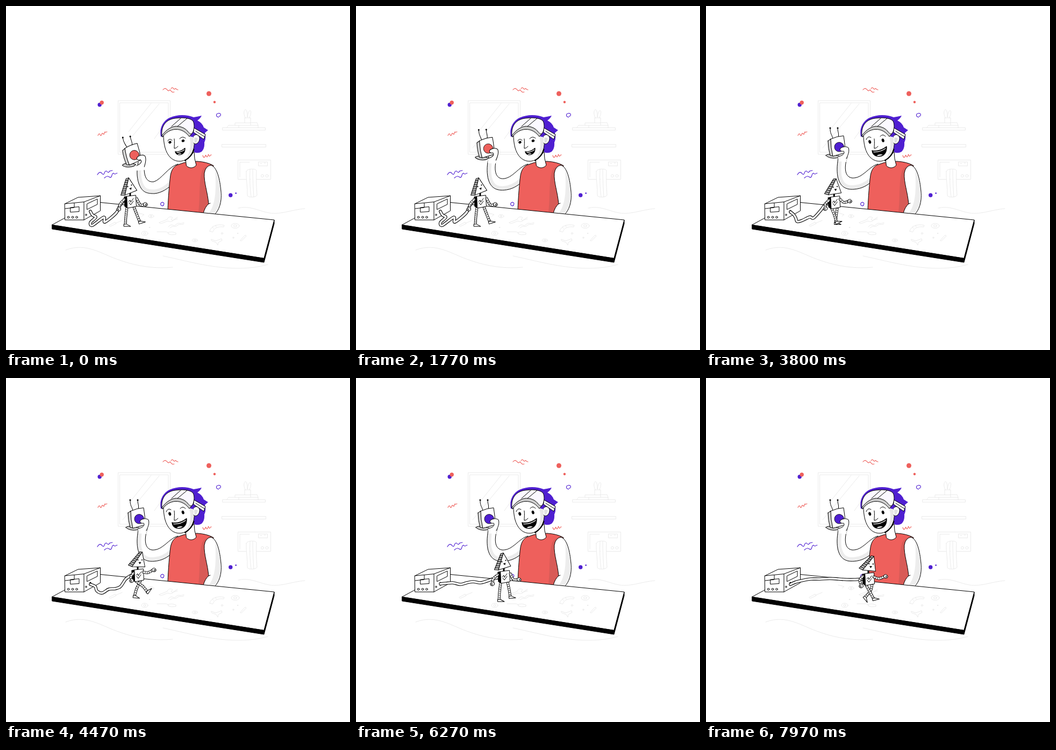
Write an HTML page that moves like this. It is 640 by 640 pixels and loops after 8 s.

```html
<!DOCTYPE html>
<html lang="en">
<head>
<meta charset="utf-8">
<title>Workbench</title>
<style>
  html, body { margin: 0; width: 100%; height: 100%; overflow: hidden; background: #fff; }
  svg { display: block; width: 100%; height: 100%; }
  svg * { stroke-linecap: round; stroke-linejoin: round; }
  .faint { fill: none; stroke: #e8e8e8; stroke-width: .9; }
  .ink { fill: #fff; stroke: #000; stroke-width: 1; }
  .line { fill: none; stroke: #000; stroke-width: 1; }
  .red { fill: none; stroke: #ee605c; stroke-width: 1.1; }
  .blue { fill: none; stroke: #4f1fd1; stroke-width: 1.1; }
</style>
</head>
<body>
<svg viewBox="0 0 640 640">
  <defs><clipPath id="armClip"><path id="armClipPath"/></clipPath></defs>

  <g class="faint">
    <path d="M209,176H305.5V276H209ZM212,180H302V272H212ZM228,234L270,181M217,264L285,182M276,247L302,210"/>
    <path d="M403,226.500H482.500V231H403ZM402,257.500H483.500V262.500H402Z"/>
    <path d="M411,226L414,222H433V226M426,222V217.500H455V222M433,222H469V226M455,217H467L469,222M444,217V208H455V217M445,208C441,199 443,192 446,193C449,194 449,202 449,207C450,200 452,193 455,195C457,198 454,205 453,208"/>
    <path d="M432,286.500H492.500V322.500H432ZM470,290H486.500V297.500H470ZM435,318V290.500H453M473,293H476M480,292H483"/>
    <circle cx="477" cy="316" r="2.500"/><circle cx="485.500" cy="316" r="2.500"/>
    <path fill="#fff" d="M447,308C448,302 464,302 466,306C465,322 466,338 467,352C465,356 452,357 449,353C450,338 446,322 447,308ZM454,304C453,322 454,340 456,355M459,304C459,322 460,340 461,355"/>
    <path d="M432,376C452,371 467,380 485,384C508,390 530,379 556,377M111,454C150,439 178,462 212,473C245,485 280,489 310,486M292,465C345,476 420,500 487,481"/>
  </g>

  <g class="red">
    <path d="M292,156C296,151 298,154 301,157C304,160 304,153 307,158C309,162 311,160 313,160M307,154C310,149 311,154 313,155C315,155 315,151 317,155L320,156"/>
    <path d="M171,241C174,234 175,240 176,241C179,242 177,234 181,238C184,241 182,232 185,235L188,234"/>
    <path d="M366,278C368,284 370,282 371,278C373,276 372,283 375,280C377,275 376,275 378,279C380,281 380,276 382,277"/>
  </g>
  <g class="blue">
    <path d="M170,314C174,307 177,309 180,313C184,315 182,306 187,307C191,312 191,309 193,307L198,306M183,320C189,314 191,318 194,319C198,319 196,311 200,311C204,315 203,311 207,311"/>
    <path d="M396,207C390,206 390,200 396,199.500C401,200 400,206 396,205M293,371C289,374 286,368 289,366C293,363 296,369 292,371"/>
  </g>
  <g fill="#4f1fd1"><circle cx="174.200" cy="183.800" r="3.700"/><circle cx="417.800" cy="352" r="3.700"/><circle cx="427.700" cy="348.300" r="1.300"/></g>
  <g fill="#ee605c"><circle cx="178.200" cy="179.700" r="3.700"/><circle cx="377.500" cy="163" r="4.500"/><circle cx="388" cy="178.700" r="2.200"/></g>

  <path id="armFill" fill="#fff"/>
  <path id="armShade" fill="none" stroke="#ececec" stroke-width="15" clip-path="url(#armClip)"/>
  <path id="armIn" class="line"/><path id="armOut" class="line"/>

  <g id="gadget">
    <path class="ink" style="fill:#ccc" d="M223,278C226,274 240,276 248,280C244,285 228,284 223,278Z"/>
    <path class="line" d="M236,247C235,240 231,239 231,228M246,244C248,238 245,234 245,228"/>
    <circle cx="231" cy="227" r="1.500"/><circle cx="245" cy="227" r="1.500"/>
    <path class="ink" style="fill:#d6d6d6" d="M227,251L232,247.500L236,279L231,278Q227,265 227,251Z"/>
    <path class="ink" d="M232,247.500Q244,242 256,241.500Q259,258 259,273L236,279.500Q232,264 232,247.500Z"/>
    <circle id="button" cx="247.800" cy="262.300" r="8.800" stroke="#000" stroke-width=".8"/>
    <g id="thumb">
      <path fill="#fff" d="M246,280L255,277L257,270L265,271L261,290L246,289Z"/>
      <path class="ink" d="M261,284C265,276 267,269 265,264C261,260 253,262 250,265C248,269 252,271 256,270C259,274 255,278 247,280"/>
    </g>
  </g>

  <path class="ink" style="fill:#ee605c" d="M301,379C302,355 304,330 306,315C308,304 313,297 321,295Q330,291 340,290L356,289Q374,290 386,297L374,386Z"/>
  <path fill="#d85b57" d="M365,306C358,330 362,350 358,384L371,386L379,369C370,340 367,312 380,297Q370,297 365,306Z"/>
  <path class="ink" d="M381,296C393,299 398,323 400,345C402,366 396,380 388,388L367,386Q370,374 377,368C375,345 368,329 369,311Q371,298 381,296Z"/>
  <path fill="#ededed" d="M389,304C396,319 399,340 399.500,350C400,367 394,380 387,387L377,386C389,371 392,345 389,304Z"/>
  <path class="line" d="M377,368L380,367"/>

  <path fill="#4f1fd1" d="M288,243C285,228 291,215 304,208C320,201 336,202 349,207Q356,206 364,204Q361,210 356,213Q365,217 368,226L376,231L370,236Q373,246 369,254Q370,265 364,271Q357,275 350,272L341,240Z"/>
  <path class="ink" d="M334,284L335.500,297C341,303 350,302 354,296Q350,284 350,272Z"/>
  <path class="ink" d="M293,238C293,256 296,272 306,282C318,293 334,290 343,278C350,269 351,258 350,246L339,228L310,218Z"/>
  <path fill="#e8e8e8" d="M341,242C345,258 343,272 334,285C345,279 350,266 349.500,246Z"/>
  <path d="M341,235L351,238L350,244L343,243Z" fill="#4f1fd1"/>
  <path class="line" style="stroke-width:2" d="M333,287.500Q346,280 349.500,267"/>
  <path class="ink" d="M349,242C354,236 361,241 360,248C359,255 353,259 349,255"/>
  <path fill="#e0e0e0" d="M350,246Q355,243 357,247Q355,254 351,255Z"/>
  <path class="ink" d="M350,227L371,239L368,248L349,235Z"/>
  <path class="line" d="M353,233L369,243"/>
  <path class="ink" style="fill:#cfcfcf" d="M290,241L291,244C297,235 306,230 315,229.500C327,229 335,235 341,243L347,236L335,222H300Z"/>
  <path class="ink" style="fill:#fbf9ff" d="M290,241C288,222 299,211 314,209C328,207 341,208 347,213C351,217 351,229 347,236C344,240 341,237 338,233C332,226 323,223 314,224C304,226 297,232 290,241Z"/>
  <path class="line" d="M308,224L325,209M319,224L337,209"/>
  <path class="line" d="M313,247C314,254 313,259 313,265Q317,265 320,261"/>
  <path id="mouth" stroke="#000"/>
  <path id="teeth" fill="none" stroke="#fff" stroke-width="1.300"/>
  <path id="tongue" fill="#fff"/>
  <ellipse id="eyeL"/><ellipse id="eyeR"/>
  <path id="brows" class="line"/>

  <path d="M86,407L480,469L499,398V405L480,477L86,415Z" stroke="#000"/>
  <path class="ink" d="M86,407L134,381L176,365.500L499,398L480,469Z"/>
  <g class="faint">
    <path d="M192,408L203,402L205,405L194,410ZM204,404L216,399M281,420H298L302,422M302,421Q308,419 316,422V425Q308,427 302,424Z"/>
    <path d="M285,403L300,397C301,392 307,391 310,394L307,397L310,399L319,393M285,403L288,405L301,400Q308,403 312,398L319,396M302,411C309,402 311,412 316,407C321,401 323,407 331,403M305,413C311,407 314,413 319,408C324,404 326,409 331,405"/>
    <ellipse cx="258" cy="423" rx="6" ry="4"/><circle cx="258" cy="423" r="2"/><ellipse cx="270" cy="391" rx="5" ry="3"/><circle cx="270" cy="391" r="1.500"/>
    <ellipse cx="351.500" cy="436" rx="5" ry="2.800"/><ellipse cx="351.500" cy="436" rx="2" ry="1.200"/>
    <ellipse cx="426.500" cy="409" rx="7.500" ry="4.500"/><ellipse cx="426.500" cy="409" rx="3" ry="2"/>
    <path d="M379,419C381,409 394,405 406,408L405,411C396,410 387,412 385,420ZM384,411L386,414M390,408L391,411M382,434L390,437L401,433L402,436L395,440L394,445L391,440L383,437ZM436,436L445,426L447,428L438,437ZM246,385L257,388L253,391"/>
    <circle cx="402" cy="423" r="1.500"/><circle cx="423" cy="431" r="1.200"/><circle cx="431" cy="423" r=".8"/><circle cx="267" cy="412" r=".8"/>
  </g>

  <path class="ink" d="M109.500,368L134,356L175.500,353V381L145,398L110,398Z"/>
  <path class="line" d="M109.500,368L145,364.500L175.500,353M145,364.500V398M110,377L127,375V367M120,375L136,373.500V382.500L120,383.500ZM151,368L170,359V369L151,378.500Z"/>
  <g class="line"><circle cx="116" cy="393" r="1.800"/><circle cx="124" cy="393" r="1.800"/><circle cx="131.500" cy="393" r="1.800"/><circle cx="149" cy="388.500" r="1.400"/></g>
  <ellipse cx="157" cy="383" rx="2" ry="3.500"/>

  <path id="cableOut" fill="none" stroke="#000" stroke-width="5.600"/>
  <path id="cableIn" fill="none" stroke="#fff" stroke-width="3.400"/>

  <g id="robot">
    <g id="legs"></g>
    <path class="line" style="stroke-width:3" d="M-1,-16L-1,-10"/>
    <path d="M-12,-9L-7,-10L-6,12L-11,9Z" stroke="#000" stroke-width=".8"/>
    <path class="ink" d="M-7,-10L9.500,-12L10.500,9L-6,12Z"/>
    <path class="line" d="M-4,0L-1,-3L0,1L5,-6M-3,2L0,6L5,-1"/>
    <g id="arms"></g>
    <g id="head">
      <path class="ink" style="fill:#bbb" d="M4,-27.500L9,-27L-10,0L-17,-3Z"/>
      <path class="line" id="hatch"/>
      <path class="ink" d="M9,-27L14,.5L-10,0Z"/>
      <circle cx="1" cy="-12.500" r="1.100"/><circle cx="8.500" cy="-12.500" r="1.100"/>
      <path d="M2,-8.500L7,-8.500L4.500,-4.500Z"/>
    </g>
  </g>
</svg>
<script>
const $ = id => document.getElementById(id);
const set = (id, attrs) => { for (const k in attrs) $(id).setAttribute(k, attrs[k]); };
const clamp = v => Math.max(0, Math.min(1, v));
const ease = v => .5 - .5 * Math.cos(Math.PI * clamp(v));
const lerp = (a, b, p) => a + (b - a) * p;
const lerpAll = (a, b, p) => a.map((v, i) => lerp(v, b[i], p));
const NUM = /-?\d+(\.\d+)?/g;
const mix = (a, b, p) => {
  const to = b.match(NUM);
  let i = 0;
  return a.replace(NUM, n => lerp(+n, +to[i++], p).toFixed(2));
};

const LOOP = 8000, PRESS = 2350;

const armIn = ['M320,294C302,299 289,323 275,327C258,329 255,310 258,286',
               'M320,294C303,298 292,321 272,320C257,318 257,298 263,281'];
const armOut = ['M246,290C243,305 243,318 247,330C253,347 262,349 276,349C290,348 303,338 309,332',
                'M247,278C244,292 243,305 245,317C249,337 261,342 275,341C290,340 300,334 309,326'];
const mouth = ['M315,271C322,272 329,268 333,264C334,272 329,277 322,277C318,277 315,274 315,271Z',
               'M309,269C318,271 329,267 336,261C337,272 332,280 322,280C314,280 309,276 309,269Z'];
const teeth = ['M318,272.5Q326,272 331.500,267.500', 'M312,271.5Q325,272 334,265'];
const tongue = ['M319,276Q323,273 327,275Q323,277 319,276Z', 'M317,278.5Q323,275 329,276.5Q324,280 317,278.5Z'];
const brows = ['M301,251Q304,245 309,250M323,247Q328,241 334,246',
               'M298,249Q301,241 307,245M324,243Q329,237 334,243'];

// Joints relative to the body: hip, knee, ankle, foot angle / shoulder, elbow, hand
const rest = { head: -23, legL: [-7,11,-9,28,-10,43,0], legR: [6,10,11,23,17,38,-18],
  armL: [-12,-4,-20,5,-21,14], armR: [11,-6,18,6,26,5] };
const spread = { head: -19, legL: [-7,11,-9,28,-10,43,0], legR: [6,10,9,24,11,37,-5],
  armL: [-12,-4,-21,4,-21,13], armR: [11,-6,17,5,26,5] };
const kick = { head: 0, legL: [-4,11,9,21,17,31,-55], legR: [4,11,-3,25,-7,39,5],
  armL: [-9,-4,-14,3,-11,10], armR: [9,-6,18,-5,28,-10] };
const cross = { head: 4, legL: [-6,10,2,24,9,37,-15], legR: [6,10,3,22,-7,34,50],
  armL: [-11,-5,-17,2,-13,13], armR: [9,-4,19,-1,30,-5] };
const pass = { head: -10, legL: [-6,11,-4,26,-8,43,5], legR: [6,10,3,25,-6,41,8],
  armL: [-11,-4,-20,6,-17,15], armR: [10,-6,21,4,31,0] };
const walk = [[0, rest, 232, 364], [PRESS, rest, 232, 364], [3130, spread, 232.5, 364],
  [4470, kick, 246, 367], [4830, cross, 252, 367], [5230, pass, 258, 367.5],
  [6270, spread, 276, 370], [7610, kick, 297.5, 373], [7970, cross, 303, 374], [LOOP, cross, 303.5, 374]];

const slack = [157,382,161,389,167,393,157,403,161,408,182,393,184,402,205,385,212,371,221,360];
const cable = [[0, slack], [PRESS, slack],
  [3130, [157,382,161,389,165,393,160,402,165,406,183,393,187,401,206,384,213,371,221,361]],
  [4470, [157,384,166,388,169,396,179,400,191,393,203,392,213,388,222,375,228,370,235,366]],
  [5230, [157,384,166,386,176,388,184,393,197,387,208,388,218,384,228,376,237,371,247,367]],
  [6270, [157,383,167,382,180,381,194,384,206,381,218,379,231,381,243,378,254,374,265,371]],
  [7970, [157,384,166,380,178,377,195,374,212,374,230,373,247,374,262,375,276,375,291,374]]];

function span(keys, t) {
  let i = 0;
  while (i < keys.length - 2 && t >= keys[i + 1][0]) i++;
  const a = keys[i], b = keys[i + 1];
  return [a, b, clamp((t - a[0]) / (b[0] - a[0]))];
}

// Catmull-Rom spline through a flat list of points
function spline(v) {
  const n = v.length / 2, pt = i => { i = Math.max(0, Math.min(n - 1, i)); return [v[2 * i], v[2 * i + 1]]; };
  let d = `M${pt(0)}`;
  for (let i = 0; i < n - 1; i++) {
    const [a, b, c, e] = [pt(i - 1), pt(i), pt(i + 1), pt(i + 2)];
    d += `C${[0, 1].map(k => b[k] + (c[k] - a[k]) / 6)} ${[0, 1].map(k => c[k] - (e[k] - b[k]) / 6)} ${c}`;
  }
  return d;
}

function tube(v) {
  const d = spline(v.slice(0, 6));
  const stroke = (color, width, extra = '') =>
    `<path d="${d}" fill="none" stroke="${color}" stroke-width="${width}" ${extra}/>`;
  return stroke('#000', 5) + stroke('#fff', 3.3) +
    stroke('#000', 3.3, 'stroke-dasharray=".8 3" style="stroke-linecap:butt"');
}
const leg = v => tube(v) + `<path class="ink" transform="translate(${v[4]} ${v[5]}) rotate(${v[6]})" d="M-2.500,-1L2,-1.500Q6,1 10,3L-2.500,3Z"/>`;
const arm = (v, side) => tube(v) + `<path class="ink" transform="translate(${v[4]} ${v[5]}) scale(${side} 1)" d="M-2,-2Q2,-5 4,-2Q7,0 4,3Q1,5 -2,2ZM1,0L4,-1M1,2L4,1"/>`;

let hatch = '';
for (let i = 1; i < 8; i++) {
  const k = i / 8;
  hatch += `M${lerp(4, -17, k)},${lerp(-27.5, -3, k)}L${lerp(9, -10, k)},${lerp(-27, 0, k)}`;
}
set('hatch', { d: hatch });

function drawPerson(t) {
  const p = ease(t / 2500), away = 1 - p;
  const inner = mix(...armIn, p), outer = mix(...armOut, p);
  // The outline runs up the inner edge and back along the outer one
  const whole = inner + outer.replace('M', 'L') + 'Z';
  set('armFill', { d: whole });
  set('armClipPath', { d: whole });
  set('armShade', { d: outer });
  set('armIn', { d: inner });
  set('armOut', { d: outer });
  set('gadget', { transform: `translate(${-9 * away} ${15 * away}) rotate(${-8 * away} 248 262)` });
  set('thumb', { transform: `translate(${2 * away} ${2.5 * away})` });
  set('button', { fill: t < PRESS ? '#ee605c' : '#4f1fd1' });

  const joy = ease((t - 2400) / 1500), up = ease((t - 2350) / 700);
  const bob = up * .4 * Math.sin(t / 130);
  set('mouth', { d: mix(...mouth, joy) });
  set('teeth', { d: mix(...teeth, joy) });
  set('tongue', { d: mix(...tongue, joy) });
  set('brows', { d: mix(...brows, up), transform: `translate(0 ${bob})` });
  const eye = (id, x, y) => set(id, { cx: x, cy: y - up * .8, rx: lerp(2.8, 2.4, up), ry: lerp(2.3, 3.5, up), transform: `rotate(-18 ${x} ${y})` });
  eye('eyeL', 305, 253.5);
  eye('eyeR', 329.5, 250.8);
}

function drawRobot(t) {
  const [a, b, p] = span(walk, t);
  const part = k => lerpAll(a[1][k], b[1][k], p);
  set('robot', { transform: `translate(${lerp(a[2], b[2], p)} ${lerp(a[3], b[3], p)})` });
  set('head', { transform: `translate(-1.500 -16) rotate(${lerp(a[1].head, b[1].head, p)})` });
  $('legs').innerHTML = leg(part('legR')) + leg(part('legL'));
  $('arms').innerHTML = arm(part('armL'), -1) + arm(part('armR'), 1);
  const [c, e, q] = span(cable, t), d = spline(lerpAll(c[1], e[1], q));
  set('cableOut', { d });
  set('cableIn', { d });
}

const start = performance.now();
function frame() {
  const t = (performance.now() - start) % LOOP;
  drawPerson(t);
  drawRobot(t);
  requestAnimationFrame(frame);
}
frame();
</script>
</body>
</html>
```
